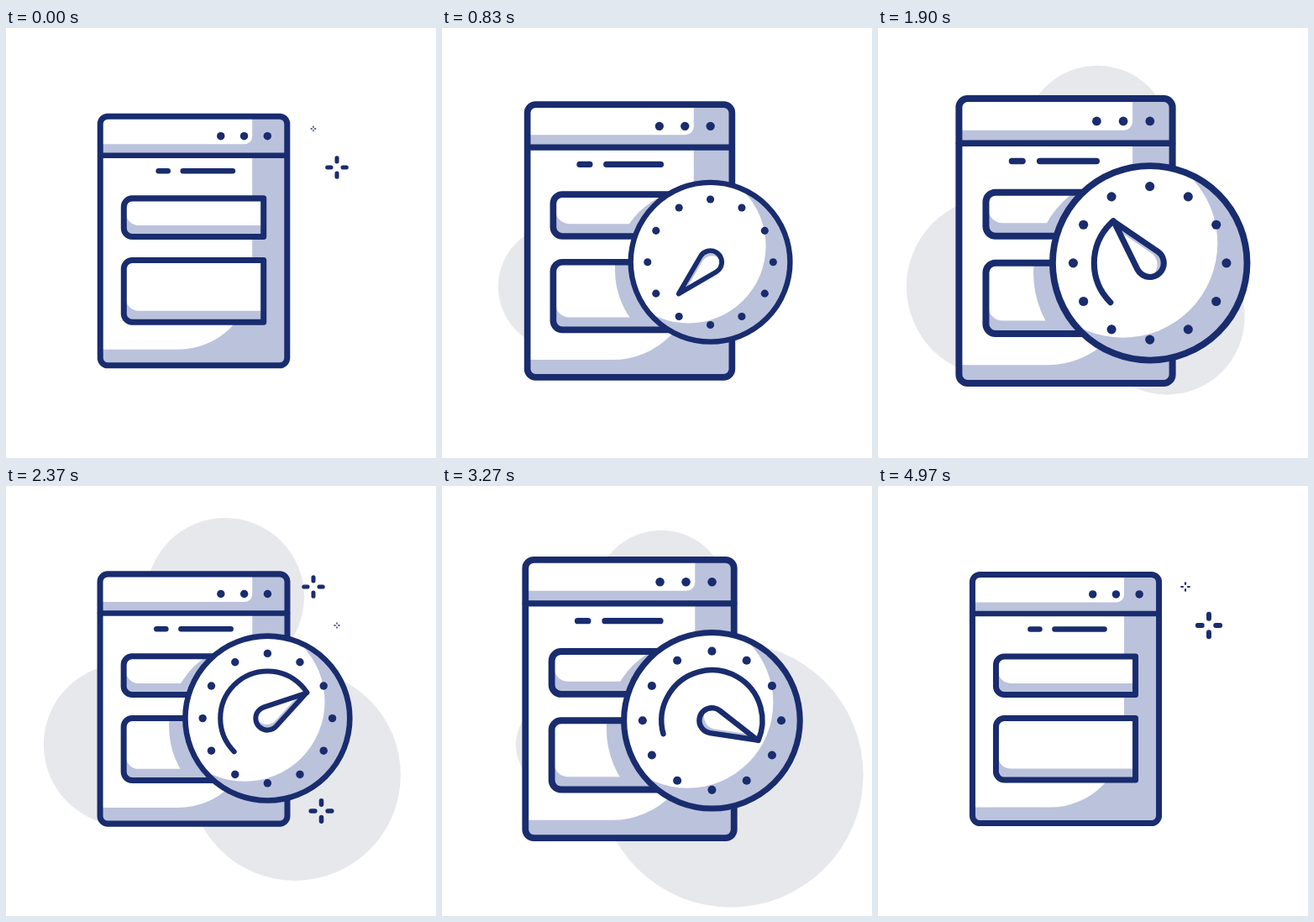
An HTML page with a canvas that plays this animation: 512 px wide and 512 px high, repeating every 5000 ms.

```html
<!DOCTYPE html>
<html>
<head>
<meta charset="utf-8">
<style>
html, body { margin: 0; width: 100%; height: 100%; overflow: hidden; background: #fff; }
canvas { display: block; }
</style>
</head>
<body>
<canvas id="stage" width="512" height="512"></canvas>
<script>
const c = document.getElementById('stage').getContext('2d');
const LOOP = 5000, BEAT = 1250, TAU = Math.PI * 2, DEG = Math.PI / 180;
const NAVY = '#192c6e', SHADE = '#bbc2dc', GREY = '#e7e8ec', WHITE = '#fff';

const ease = u => u < 0.5 ? 2 * u * u : 1 - 2 * (1 - u) ** 2;
const ramp = (t, a, b) => ease(Math.min(1, Math.max(0, (t - a) / (b - a))));

// One smooth swell per beat: 1 at the peak time, 0 half a beat away
function swell(t, peak) {
  const d = (((t - peak) % BEAT) + BEAT) % BEAT;
  return 1 - ease(Math.min(d, BEAT - d) / (BEAT / 2));
}

function keyed(t, keys) {
  let v = keys[0][1];
  for (let i = 1; i < keys.length; i++) {
    const [t0, v0] = keys[i - 1], [t1, v1] = keys[i];
    if (t >= t0) v = v0 + (v1 - v0) * ramp(t, t0, t1);
  }
  return v;
}

const GAUGE_KEYS = [[50, 0], [540, 1.16], [860, 0.88], [1480, 1.085],
  [2250, 1], [3150, 0.955], [4020, 1.05], [4780, 0]];

// x, y, radius, grow start, grow end, shrink start, shrink end
const BLOBS = [
  [141, 308, 110, 140, 1300, 1500, 4980],
  [261, 132, 94, 190, 2300, 2600, 5000],
  [344, 344, 159, 0, 3500, 3650, 4990]
];

// x, y, start, peak, end within half a loop
const SPARKS = [
  [366, 120, 2220, 2320, 2545],
  [394, 166, 2350, 2450, 2680],
  [375.5, 387, 2250, 2355, 2460]
];

function fill(color) { c.fillStyle = color; c.fill(); }

function stroke(width) {
  c.strokeStyle = NAVY;
  c.lineWidth = width;
  c.stroke();
}

function disc(x, y, r, color) {
  c.beginPath();
  c.arc(x, y, r, 0, TAU);
  fill(color);
}

function box(x, y, w, h, radii) {
  c.beginPath();
  c.roundRect(x, y, w, h, radii);
}

function line(x0, y0, x1, y1, width) {
  c.beginPath();
  c.moveTo(x0, y0);
  c.lineTo(x1, y1);
  stroke(width);
}

function clipped(draw) {
  c.save();
  c.clip();
  draw();
  c.restore();
}

function field(y, h, size) {
  const outline = () => box(140.5, y, 166, h, [10, 0, 0, 10]);
  outline();
  fill(SHADE);
  clipped(() => {
    box(143, y, 164, h - 13.5, [0, 0, 0, 15]);
    fill(WHITE);
    if (size > 0) disc(311 - 16 * size, 276.5 + 10 * size, 101 * size, SHADE);
  });
  outline();
  stroke(7);
}

function page(t, size) {
  const frame = () => box(112.5, 105.5, 222, 296, 9);
  frame();
  fill(SHADE);
  clipped(() => {
    box(112, 105, 181, 33.5, [0, 0, 9, 0]);
    fill(WHITE);
    box(112, 152, 181, 230.5, [0, 0, 88, 0]);
    fill(WHITE);
  });
  frame();
  stroke(7);
  line(112.5, 152, 334.5, 152, 6.5);
  for (let i = 0; i < 3; i++) disc(255.7 + 27.7 * i, 129, 4.7, NAVY);

  const shift = -14.5 * swell(t, 680);
  line(182 + shift, 170.5, 193 + shift, 170.5, 6.5);
  line(211 + shift, 170.5, 270 + shift, 170.5, 6.5);
  field(203, 45.5, size);
  field(276.5, 73.5, size);
}

function needle(angle) {
  const a = Math.acos(14 / 55);
  const drop = (dx, dy) => {
    c.beginPath();
    c.arc(dx, dy, 14, a, TAU - a);
    c.lineTo(55 + dx, dy);
    c.closePath();
  };
  c.save();
  c.rotate(angle * DEG);
  drop(0, 0);
  fill(SHADE);
  clipped(() => { drop(3, -6); fill(WHITE); });
  drop(0, 0);
  stroke(6);
  c.restore();
}

function gauge(t, size) {
  if (size <= 0) return;
  c.save();
  c.translate(311, 276.5);
  c.scale(size, size);
  disc(0, 0, 98, SHADE);
  clipped(() => disc(-27, -20, 95, WHITE));
  c.beginPath();
  c.arc(0, 0, 97.7, 0, TAU);
  stroke(6.6);
  for (let i = 0; i < 12; i++) {
    const a = i * TAU / 12;
    disc(77 * Math.cos(a), 77 * Math.sin(a), 4.7, NAVY);
  }
  const tip = 135 + 235 * ramp(t, 1060, 2940) + 125 * ramp(t, 3000, 4180);
  const tail = 135 + 360 * ramp(t, 3000, 4335);
  if (tip - tail > 0.5) {
    c.beginPath();
    c.arc(0, 0, 56, tail * DEG, tip * DEG);
    stroke(6);
  }
  needle(tip);
  c.restore();
}

function spark(t, [x, y, start, peak, end]) {
  let p = t % (LOOP / 2);
  if (p < 1000) p += LOOP / 2;
  const k = Math.min((p - start) / (peak - start), (end - p) / (end - peak));
  if (k <= 0) return;
  c.save();
  c.translate(x, y);
  c.scale(k, k);
  for (let i = 0; i < 4; i++) {
    c.rotate(TAU / 4);
    line(9, 0, 14.5, 0, 6.5);
  }
  c.restore();
}

function draw(now) {
  const t = now % LOOP;
  c.fillStyle = WHITE;
  c.fillRect(0, 0, 512, 512);
  c.lineCap = c.lineJoin = 'round';

  for (const [x, y, r, a, b, d, e] of BLOBS)
    disc(x, y, r * (ramp(t, a, b) - ramp(t, d, e)), GREY);

  const scale = 1 + 0.15 * swell(t, 570), size = keyed(t, GAUGE_KEYS);
  c.save();
  c.translate(223.5, 253.5);
  c.scale(scale, scale);
  c.translate(-223.5, -253.5);
  page(t, size);
  gauge(t, size);
  c.restore();

  for (const s of SPARKS) spark(t, s);
}

const begin = performance.now();
function tick() {
  draw(performance.now() - begin);
  requestAnimationFrame(tick);
}
tick();
</script>
</body>
</html>
```
